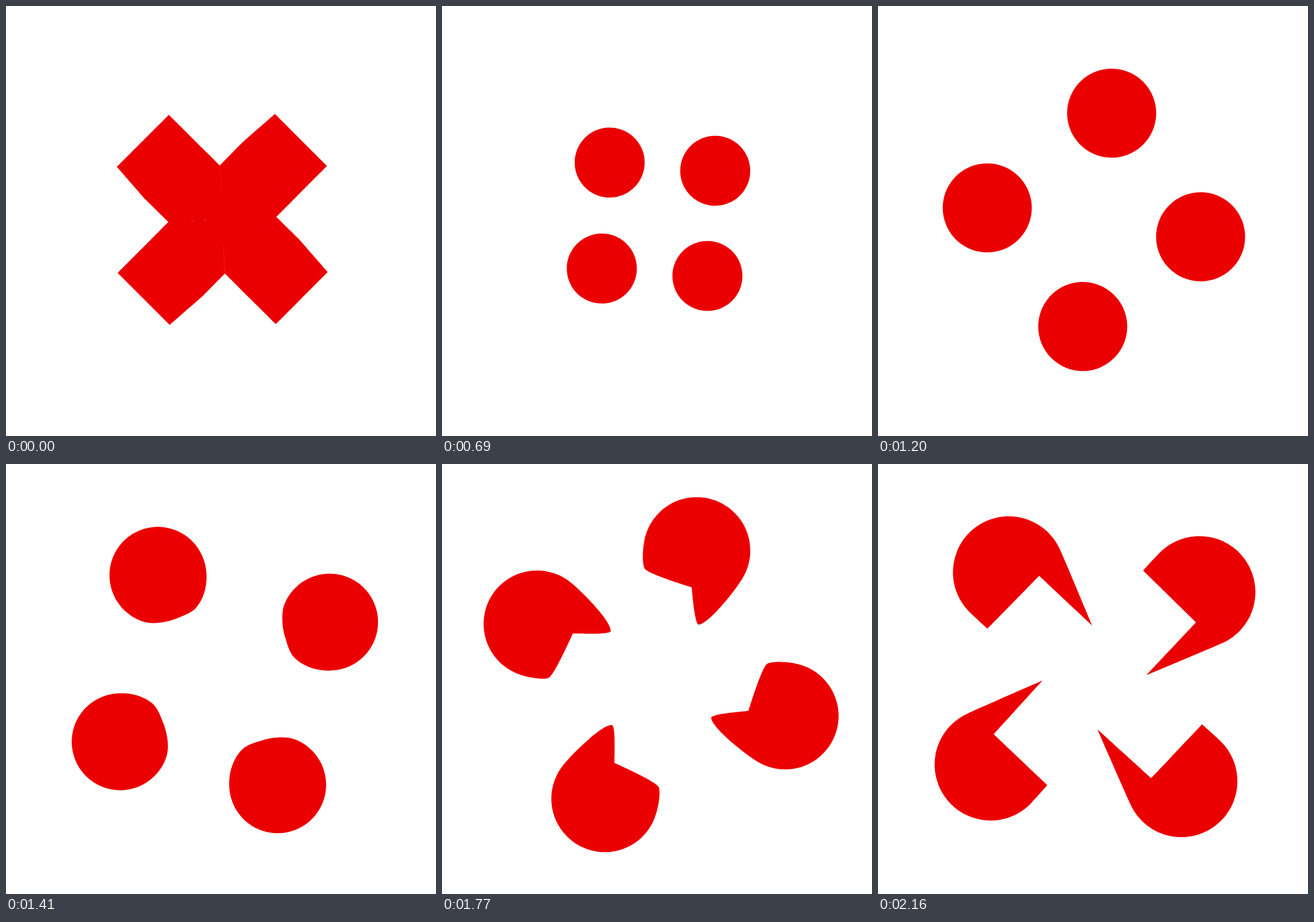
Animation, 748 px wide and 748 px high, one loop 2.19 s. Source, as an HTML page:

```html
<!DOCTYPE html>
<html lang="en">
<head>
<meta charset="utf-8">
<title>Cross and dots</title>
<style>
  html, body { margin: 0; width: 100%; height: 100%; overflow: hidden; background: #fff; }
  svg { display: block; width: 100vw; height: 100vh; }
</style>
</head>
<body>
<svg viewBox="0 0 748 748"><path id="shape" fill="#eb0000"/></svg>
<script>
const LOOP = 2190, STEP = 30;
const CENTRE = { x: 376.3, y: 371.3 };
const DOT = 57.5, ORBIT = 118.5;
const RAD = Math.PI / 180;
const shape = document.getElementById('shape');

// Outline nodes in circle radii, +x towards the stage centre. Each node has
// a place on the circle; corners also have a place in the angular shape.
const rim = angle => ({ angle });
const corner = (x, y, angle = Math.atan2(y, x) / RAD, fade = 1) => ({ x, y, angle, fade });
const armCorner = (x, y) => corner(x / DOT, y / DOT);

const ARM = [
  armCorner(-76, -63), armCorner(49, -63.3), armCorner(ORBIT, 0),
  armCorner(55, 69.6), armCorner(-1, 70), armCorner(-76, 65)
];
const HOOK = [
  rim(-75), corner(1.675, -0.554), corner(0.39, -0.38, 10, 4),
  corner(0.54, 0.933, 48), rim(83), rim(150), rim(217)
];

const lerp = (a, b, k) => a + (b - a) * k;
const progress = (t, from, to) => Math.min(1, Math.max(0, (t - from) / (to - from)));
const easeSine = u => (1 - Math.cos(Math.PI * u)) / 2;

// One turn that gathers speed for long and stops quickly
const turnAt = t => 366.4 * easeSine(progress(t, 0, LOOP) ** 2.32);

// Cubic outline between the circle (k = 0) and the angular shape (k = 1)
function outline(nodes, k, place) {
  const points = nodes.map(({ angle, x, y, fade }) => {
    const c = Math.cos(angle * RAD), s = Math.sin(angle * RAD);
    const round = x === undefined;
    return {
      x: round ? c : lerp(c, x, k), y: round ? s : lerp(s, y, k),
      tx: -s, ty: c, angle, hold: round ? 1 : (1 - k) ** fade
    };
  });
  const handle = (p, length) => place(p.x + p.tx * length * p.hold, p.y + p.ty * length * p.hold);
  let d = 'M' + place(points[0].x, points[0].y);
  points.forEach((p, i) => {
    const q = points[(i + 1) % points.length];
    const span = (q.angle - p.angle + 360) % 360;
    const length = 4 / 3 * Math.tan(span * RAD / 4);
    d += `C${handle(p, length)} ${handle(q, -length)} ${place(q.x, q.y)}`;
  });
  return d + 'Z';
}

function draw(t) {
  const arms = 1 - progress(t, 0, 490);
  const hooks = progress(t, 1375, 2160);
  const spread = easeSine(progress(t, 400, 1750));
  const distance = (ORBIT + 107 * spread) * (1 + 0.045 * hooks);
  const radius = (DOT + 31 * spread) * (1 + 0.1 * hooks);
  let d = '';
  for (let i = 0; i < 4; i++) {
    // The upper two pieces run slightly ahead of the lower two.
    const turn = turnAt(t + (i < 2 ? 8 : -8));
    const a = (-135 + 90 * i + turn) * RAD;
    const c = Math.cos(a), s = Math.sin(a);
    d += outline(arms ? ARM : HOOK, arms || hooks, (x, y) => {
      const along = distance - x * radius, across = -y * radius;
      return (CENTRE.x + along * c - across * s).toFixed(2) + ','
        + (CENTRE.y + along * s + across * c).toFixed(2);
    });
  }
  shape.setAttribute('d', d);
}

const start = performance.now();
function tick() {
  const t = (performance.now() - start) % LOOP;
  draw(Math.floor(t / STEP) * STEP);
  requestAnimationFrame(tick);
}
tick();
</script>
</body>
</html>
```
